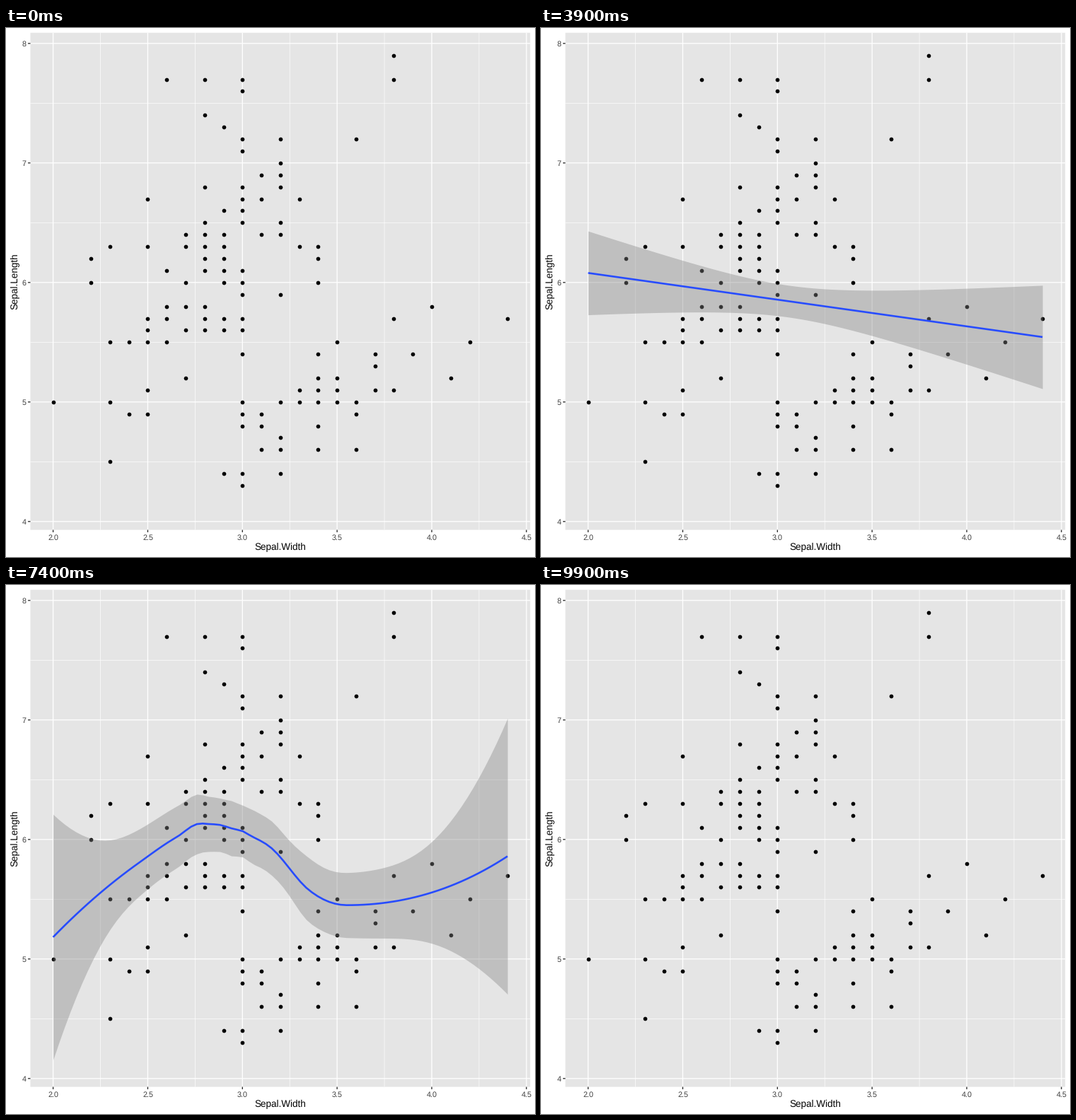
Recreate the animation shown at these times as a matplotlib script. Size 748 by 748 pixels, loop 10 s.

```python
import numpy as np
import matplotlib.pyplot as plt
from matplotlib.animation import FuncAnimation

SIZE, DPI = 748, 64
PT = 72 / DPI  # points per pixel
INTERVAL, FRAMES = 100, 100

PANEL, INK, LABEL, TICK = "#e5e5e5", "black", "#404040", "#272727"
RIBBON, BLUE, RED = "#878787", "#274cff", "#ff0000"

# Widths and lengths in tenths: width -> distinct lengths
COLUMNS = {
    20: [50],
    22: [60, 62],
    23: [45, 50, 55, 63],
    24: [49, 55],
    25: [49, 51, *range(55, 58), 63, 67],
    26: [55, 57, 58, 61, 77],
    27: [52, 56, 58, 60, 63, 64],
    28: [*range(56, 59), *range(61, 66), 68, 74, 77],
    29: [44, 56, 57, *range(60, 65), 66, 73],
    30: [43, 44, *range(48, 51), 54, 56, 57, *range(59, 62),
         *range(65, 69), 71, 72, 76, 77],
    31: [46, 48, 49, 64, 67, 69],
    32: [44, 46, 47, 50, 59, 64, 65, *range(68, 71), 72],
    33: [50, 51, 63, 67],
    34: [46, 48, *range(50, 53), 54, 60, 62, 63],
    35: [*range(50, 53), 55],
    36: [46, 49, 50, 72],
    37: [51, 53, 54],
    38: [51, 57, 77, 79],
    39: [54], 40: [58], 41: [52], 42: [55], 44: [57],
}
# Observations per width, and the sum of their lengths
COUNTS = np.array([1, 3, 4, 3, 8, 5, 9, 14, 10, 26, 11, 13,
                   6, 12, 6, 4, 3, 6, 2, 1, 1, 1, 1])
SUMS = np.array([50, 182, 213, 159, 461, 308, 527, 887, 606, 1564, 664, 765,
                 361, 638, 309, 217, 158, 366, 108, 58, 52, 55, 57])

U = np.array(list(COLUMNS)) - 30.0
GRID = np.linspace(-10, 14, 80)


def px(width):
    return 66.6 + (np.asarray(width) - 2) * 267.7


def py(length):
    return 21.8 + (8 - np.asarray(length)) * 169.0


def poly_smoother(degree):
    x = np.vander(U, degree + 1)
    return np.vander(GRID, degree + 1) @ np.linalg.solve((x.T * COUNTS) @ x, x.T)


def local_rows(z, neighbours=112):
    """Value and slope operators of a tricube-weighted quadratic at z."""
    dist = np.abs(U - z)
    reach = np.sort(np.repeat(dist, COUNTS))[neighbours - 1]
    w = np.clip(1 - (dist / reach) ** 3, 0, 1) ** 3
    x = np.vander(U - z, 3, increasing=True)
    return np.linalg.solve((x.T * (w * COUNTS)) @ x, x.T * w)[:2]


def loess_smoother():
    knots = np.array([-10.12, -5.5, -3.5, -2.5, -1.5, -0.5,
                      0, 0.5, 1.5, 3.5, 5.5, 14.12])
    rows = np.array([local_rows(z) for z in knots])
    value, slope = rows[:, 0], rows[:, 1]
    i = np.clip(np.searchsorted(knots, GRID) - 1, 0, len(knots) - 2)
    step = (knots[i + 1] - knots[i])[:, None]
    t = (GRID - knots[i])[:, None] / step
    rise = t * t * (3 - 2 * t)
    return ((1 - rise) * value[i] + rise * value[i + 1]
            + step * t * (1 - t) * ((1 - t) * slope[i] - t * slope[i + 1]))


plt.rcParams["font.family"] = "Liberation Sans"
plt.rcParams["text.hinting"] = "none"
fig = plt.figure(figsize=(SIZE / DPI, SIZE / DPI), dpi=DPI, facecolor="white")
ax = fig.add_axes([0, 0, 1, 1])
ax.set(xlim=(0, SIZE), ylim=(SIZE, 0))
ax.axis("off")

LEFT, RIGHT = px(1.88), px(4.52)
TOP, BOTTOM = py(8.089), py(3.930)


def stroke(x, y, color, width, z):
    return ax.plot(x, y, color=color, lw=width * PT, zorder=z, snap=False,
                   solid_capstyle="butt", solid_joinstyle="round")[0]


def label(x, y, text, size, color, ha="center", **kw):
    ax.text(x, y, text, fontsize=size * PT, color=color, ha=ha,
            va="baseline", **kw)


def draw_panel():
    ax.fill([LEFT, RIGHT, RIGHT, LEFT], [TOP, TOP, BOTTOM, BOTTOM],
            color=PANEL, lw=0, zorder=0, snap=False)
    for w in np.arange(2.25, 4.5, 0.5):
        stroke([px(w)] * 2, [TOP, BOTTOM], "white", 0.66, 1)
    for v in np.arange(4.5, 8, 1):
        stroke([LEFT, RIGHT], [py(v)] * 2, "white", 0.66, 1)
    for w in np.arange(2, 4.6, 0.5):
        stroke([px(w)] * 2, [TOP, BOTTOM], "white", 1.31, 2)
        stroke([px(w)] * 2, [BOTTOM, BOTTOM + 3.4], TICK, 1.31, 2)
        label(px(w), 723.4, f"{w:.1f}", 10.8, LABEL)
    for v in range(4, 9):
        stroke([LEFT, RIGHT], [py(v)] * 2, "white", 1.31, 2)
        stroke([LEFT - 3.4, LEFT], [py(v)] * 2, TICK, 1.31, 2)
        label(28.5, py(v) + 3.9, str(v), 10.8, LABEL, ha="right")
    label((LEFT + RIGHT) / 2, 738.5, "Sepal.Width", 13.5, INK)
    label(16.4, (TOP + BOTTOM) / 2, "Sepal.Length", 13.5, INK,
          rotation=90, rotation_mode="anchor")


def draw_points():
    xy = np.array([(w, v) for w, col in COLUMNS.items() for v in col]) / 10
    ax.scatter(px(xy[:, 0]), py(xy[:, 1]), s=(5.7 * PT) ** 2, color=INK,
               lw=0, zorder=3, snap=False)


def draw_fit(smoother, spread, color):
    """Fitted line with its 95% band; spread is t times the residual error."""
    x = px(3 + GRID / 10)
    mid = smoother @ SUMS
    half = spread * np.sqrt(smoother ** 2 @ COUNTS)
    band = ax.fill_between(x, py((mid - half) / 10), py((mid + half) / 10),
                           color=RIBBON, alpha=0.4, lw=0, zorder=4, snap=False)
    return band, stroke(x, py(mid / 10), color, 2.62, 5)


draw_panel()
draw_points()
fits = [
    draw_fit(poly_smoother(1), 16.305, BLUE),
    draw_fit(poly_smoother(2), 16.198, RED),
    draw_fit(loess_smoother(), 15.8, BLUE),
]


def update(frame):
    stage = (frame + 1) // 25 % 4  # 0 shows the points alone
    for k, fit in enumerate(fits, start=1):
        for artist in fit:
            artist.set_visible(k == stage)
    return [artist for fit in fits for artist in fit]


update(0)
anim = FuncAnimation(fig, update, frames=FRAMES, interval=INTERVAL,
                     repeat=True, repeat_delay=0)
plt.show()
```
